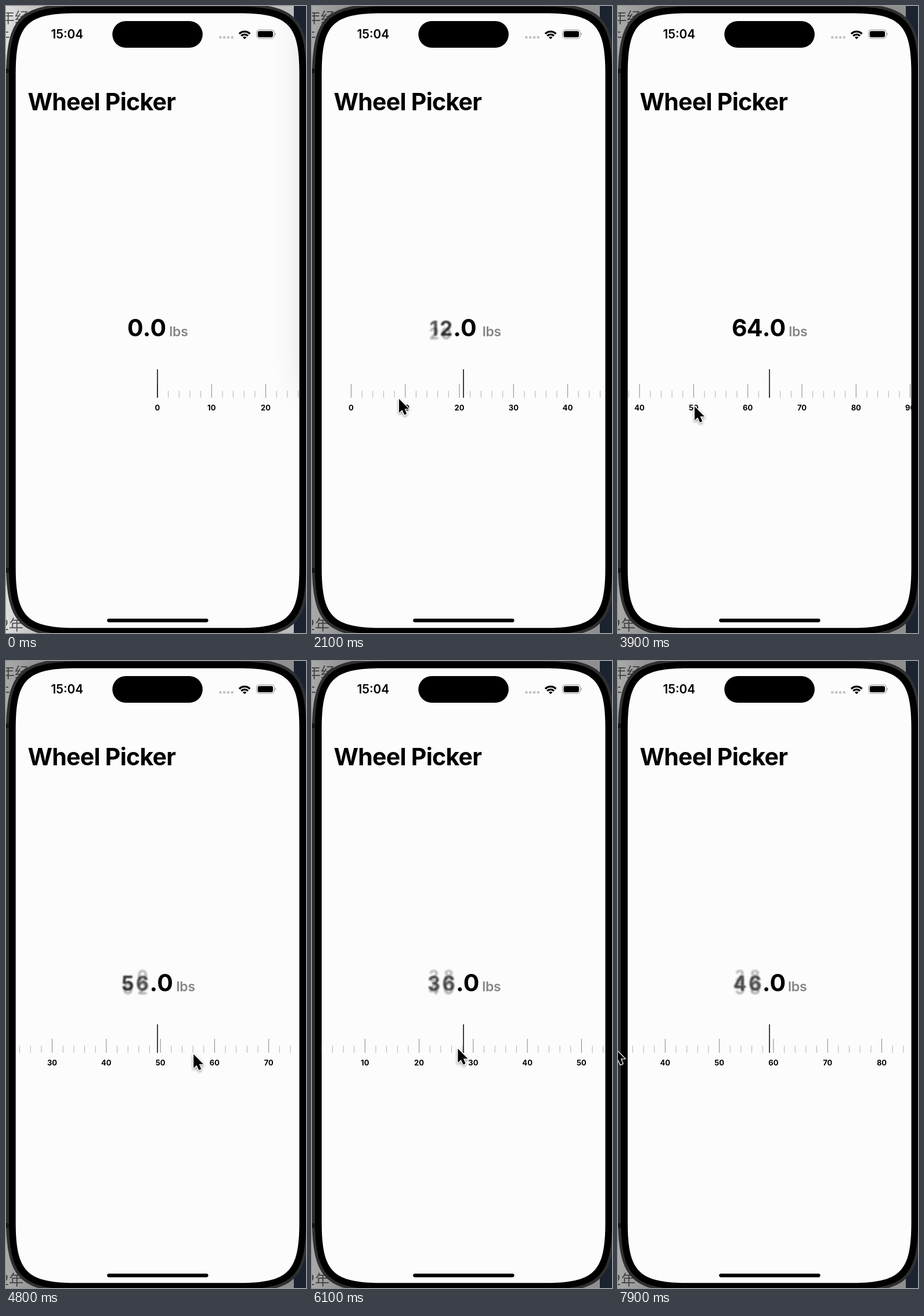
An HTML page that plays this animation: 517x1082 px, repeating every 8 s.

```html
<!DOCTYPE html>
<html lang="en">
<head>
<meta charset="utf-8">
<title>Wheel Picker</title>
<style>
  html, body { margin: 0; width: 100%; height: 100%; overflow: hidden; background: #000; }
  svg { display: block; width: 517px; height: 1082px; font-family: Inter, "Noto Sans", sans-serif; }
  .title { font-size: 41px; font-weight: 700; letter-spacing: -0.018em; }
  .clock { font-size: 20.8px; font-weight: 600; }
  .value { font-size: 41px; font-weight: 700; text-anchor: middle; }
  .unit { font-size: 23px; font-weight: 600; fill: #858585; letter-spacing: -0.01em; }
  .label { font-size: 13px; font-weight: 700; text-anchor: middle; }
  .page { font: 25px "Noto Sans CJK SC", "Noto Sans CJK JP", sans-serif; fill: #555; }
</style>
</head>
<body>
<svg viewBox="0 0 517 1082">
  <defs>
    <clipPath id="screen"><path id="glass"/></clipPath>
    <filter id="soft" x="-200%" y="-50%" width="500%" height="200%"><feGaussianBlur stdDeviation="32"/></filter>
    <linearGradient id="paper" x1="0" x2="60" gradientUnits="userSpaceOnUse">
      <stop offset="0" stop-color="#dedede"/><stop offset="1" stop-color="#bcbcbc"/>
    </linearGradient>
  </defs>

  <!-- desktop behind the phone -->
  <rect width="517" height="1082" fill="url(#paper)"/>
  <g class="page">
    <text x="-10" y="29">年经</text>
    <text x="-18" y="64">于</text>
    <text x="-9" y="1077">2年</text>
  </g>
  <rect id="dim" width="517" height="1082" opacity="0"/>
  <rect x="496" width="21" height="1082" fill="#1b2331"/>

  <!-- phone -->
  <path id="rim" fill="#2f2f2f"/>
  <rect y="108" width="5" height="8" fill="#171717"/>
  <rect y="970" width="5" height="8" fill="#171717"/>
  <path id="bezel"/>

  <g clip-path="url(#screen)">
    <rect x="16" y="12" width="490" height="1062" fill="#fcfcfc"/>
    <rect id="shade" x="518" y="-100" width="160" height="768" opacity=".14" filter="url(#soft)"/>
    <g id="ruler"></g>
    <rect x="260.3" y="627" width="1.5" height="49"/>
  </g>

  <text class="clock" x="77.4" y="56.3">15:04</text>
  <rect x="183.3" y="26" width="155.6" height="46" rx="23"/>
  <g id="dots" fill="#c3c3c3"></g>
  <g fill="none" stroke="#000" stroke-width="3.3">
    <path d="M402 48A12.8 12.8 0 0 1 420.4 48"/>
    <path d="M405.4 51.6A8 8 0 0 1 417 51.6"/>
  </g>
  <path d="M411.2 57.3L408 54A4.6 4.6 0 0 1 414.4 54Z"/>
  <rect x="431.6" y="41.1" width="30.8" height="15" rx="4.8" fill="none" stroke="#a8a8a8" stroke-width="1.2"/>
  <rect x="433.7" y="43.2" width="26.4" height="10.8" rx="3"/>
  <path d="M463.6 46A3 3 0 0 1 463.6 51.2Z" fill="#a0a0a0"/>

  <text class="title" x="37.5" y="179.5">Wheel Picker</text>
  <g id="value" class="value"></g>
  <text id="unit" class="unit" y="569.8">lbs</text>
  <rect x="174.2" y="1057.2" width="174.4" height="6.2" rx="3.1"/>

  <path id="cursor" d="M0 0V24L5.4 19L9.2 27.6L13.2 25.8L9.6 17.3H17Z" stroke="#fff" stroke-width="2.6"
    stroke-linejoin="round" paint-order="stroke" style="filter:drop-shadow(0 2px 2px #0006)"/>
</svg>
<script>
const LOOP = 8000, STEP = 100;
const CENTER = 261, UNIT = 9.33, MID = 261.5, BASE = 569.8, GAP = 5.5;
const ENTER = 500, FOCUS = 1600;
const $ = id => document.getElementById(id);

// Moves: [start ms, end ms, target...]
const FLICKS = [
  [1758, 2158, 22], [3100, 3650, 64], [4400, 5100, 40], [5800, 6500, 10],
  [6600, 6700, -3.1], [6750, 7200, 0], [7300, 8020, 64]
];
const POINTER = [
  [500, 1300, 345, 690], [1650, 2100, 150, 678], [2300, 2900, 305, 684],
  [3100, 3500, 132, 691], [4000, 4900, 330, 678], [5000, 5600, 204, 669],
  [5700, 6300, 268, 669], [6600, 6700, 389, 668], [6750, 7200, 480, 668], [7300, 7900, -5, 669]
];

const ease = p => (p = Math.min(1, Math.max(0, p)), p * p * (3 - 2 * p));
const follow = (moves, from, t) => moves.reduce((pos, [start, end, ...to]) => {
  const p = ease((t - start) / (end - start));
  return pos.map((v, i) => v + (to[i] - v) * p);
}, from);
const wheel = t => follow(FLICKS, [0], t)[0];
const reading = t => Math.max(0, Math.round(wheel(t) / 2) * 2);

// Rectangle with continuous corners
function squircle(x, y, right, bottom, r) {
  const e = 1.53 * r, c = .271 * r;
  return `M${x + e} ${y}H${right - e}C${right - c} ${y} ${right} ${y + c} ${right} ${y + e}
    V${bottom - e}C${right} ${bottom - c} ${right - c} ${bottom} ${right - e} ${bottom}
    H${x + e}C${x + c} ${bottom} ${x} ${bottom - c} ${x} ${bottom - e}
    V${y + e}C${x} ${y + c} ${x + c} ${y} ${x + e} ${y}Z`;
}

const pen = document.createElement('canvas').getContext('2d');
function width(text, font, track) {
  pen.font = font + ' Inter, "Noto Sans", sans-serif';
  return pen.measureText(text).width + track * text.length;
}
const charWidth = c => width(c, '700 41px', -0.9);
const numWidth = s => [...s].reduce((sum, c) => sum + charWidth(c), 0);
const unitWidth = () => width('lbs', '600 23px', -0.23);
const leftOf = s => MID - (numWidth(s) + GAP + unitWidth()) / 2;

function glyph(c, x, dy = 0, alpha = 1, blur = 0, size = 1) {
  const fx = blur ? ` style="filter:blur(${blur}px)"` : '';
  return `<text transform="translate(${x} ${BASE + dy}) scale(${size})" opacity="${alpha}"${fx}>${c}</text>`;
}

// Each digit trails the wheel: the old one leaves blurred, the next one arrives blurred.
function drawValue(t) {
  const [old, now, next] = [t - 265, t - 130, t - 10].map(reading);
  const text = now.toFixed(1);
  const [was, will] = [old, next].map(v => v.toFixed(1).padStart(text.length).slice(-text.length));
  const [above, below] = next >= old ? [was, will] : [will, was];
  let x = leftOf(text), out = '';
  [...text].forEach((c, i) => {
    const w = charWidth(c), cx = x + w / 2;
    const leaving = was[i] !== c, coming = will[i] !== c;
    if (above[i] !== c) out += glyph(above[i], cx, -17, .3, 2.6, .65);
    if (below[i] !== c) out += glyph(below[i], cx, 5, .35, 2.6, .65);
    out += leaving || coming
      ? glyph(c, cx, -1, leaving && coming ? .65 : .8, 1.4, .85)
      : glyph(c, cx);
    x += w;
  });
  $('value').innerHTML = out;
  const target = next.toFixed(1);
  $('unit').setAttribute('x', leftOf(target) + numWidth(target) + GAP);
}

function build() {
  $('rim').setAttribute('d', squircle(0, -4, 522.3, 1089.5, 85));
  $('bezel').setAttribute('d', squircle(5, 1, 517.3, 1084.5, 80));
  $('glass').setAttribute('d', squircle(16.7, 12.5, 505.5, 1073.3, 69));
  let marks = '';
  for (let v = 0; v <= 100; v += 2) {
    const x = v * UNIT, major = v % 10 === 0;
    const [tall, color] = major ? [24, '#858585'] : [12, '#b0b0b0'];
    marks += `<rect x="${x - .5}" y="${676 - tall}" width="1" height="${tall}" fill="${color}"/>`;
    if (major) marks += `<text class="label" x="${x}" y="697.5">${v}</text>`;
  }
  $('ruler').innerHTML = marks;
  $('dots').innerHTML = [0, 1, 2, 3].map(i =>
    `<rect x="${367.3 + i * 6.8}" y="52" width="4.2" height="4.2" rx="1.2"/>`).join('');
}

function draw(t) {
  $('ruler').setAttribute('transform', `translate(${CENTER - wheel(t) * UNIT} 0)`);
  drawValue(t);
  $('cursor').setAttribute('transform', `translate(${follow(POINTER, [502, 790], t).join(' ')})`);
  $('cursor').setAttribute('visibility', t < ENTER ? 'hidden' : 'visible');
  $('shade').setAttribute('visibility', t < ENTER ? 'visible' : 'hidden');
  $('dim').setAttribute('opacity', t < FOCUS ? 0 : .24);
}

build();
const start = performance.now();
let last = -1;
function tick() {
  const t = Math.floor((performance.now() - start) % LOOP / STEP) * STEP;
  if (t !== last) draw(last = t);
  requestAnimationFrame(tick);
}
tick();
</script>
</body>
</html>
```
